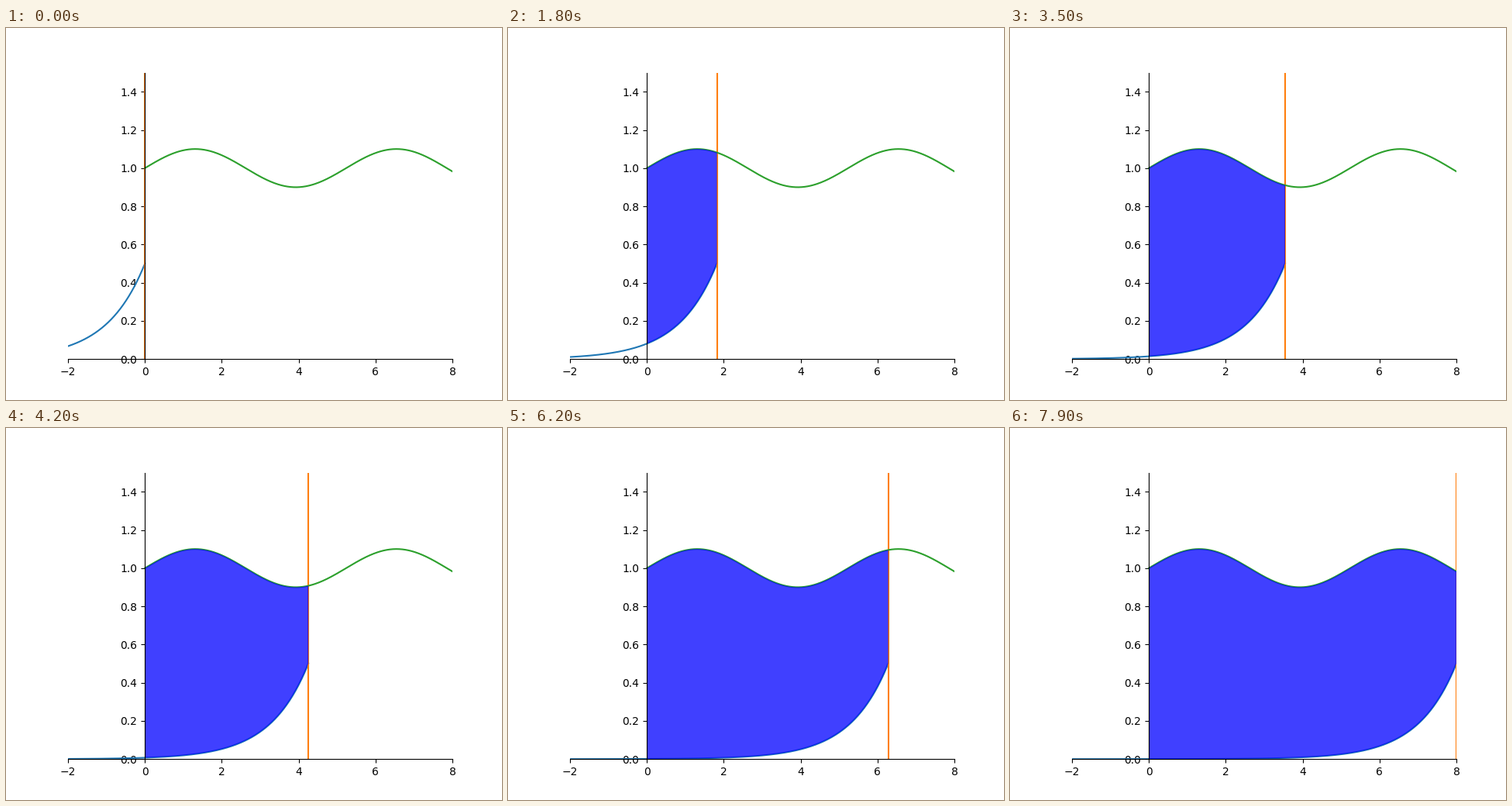
A matplotlib script for the animation above (8000 ms loop, 640 by 480 pixels).

```python
import numpy as np
import matplotlib.pyplot as plt
from matplotlib.animation import FuncAnimation

FRAMES = 80
INTERVAL = 100
X_MIN, X_MAX, Y_MAX = -2, 8, 1.5
fronts = np.linspace(0, X_MAX, FRAMES)


def wave(x):
    return 1 + 0.1 * np.sin(1.2 * x)


def growth(x, front):
    return 0.5 * np.exp(x - front)


fig, ax = plt.subplots(figsize=(6.4, 4.8), dpi=100)
ax.set_xlim(X_MIN, X_MAX)
ax.set_ylim(0, Y_MAX)
ax.spines["left"].set_position("zero")
ax.spines[["top", "right"]].set_visible(False)

growth_line, = ax.plot([], [])
front_line, = ax.plot([], [])
xs = np.linspace(0, X_MAX, 400)
ax.plot(xs, wave(xs))
# The translucent area lies over the curves but under the axis spines.
area, = ax.fill([0, 0, 0], [0, 0, 0], color="blue", alpha=0.75,
                linewidth=0, zorder=2.2)


def update(frame):
    front = fronts[frame]
    x = np.linspace(X_MIN, front, 400)
    growth_line.set_data(x, growth(x, front))
    front_line.set_data([front, front], [0, Y_MAX])

    x = np.linspace(0, front, 400)
    lower = np.column_stack([x, growth(x, front)])
    upper = np.column_stack([x, wave(x)])
    area.set_xy(np.vstack([lower, upper[::-1]]))
    area.set_visible(front > 0)
    return growth_line, front_line, area


anim = FuncAnimation(fig, update, frames=FRAMES, interval=INTERVAL,
                     repeat=True, repeat_delay=0)
plt.show()
```
